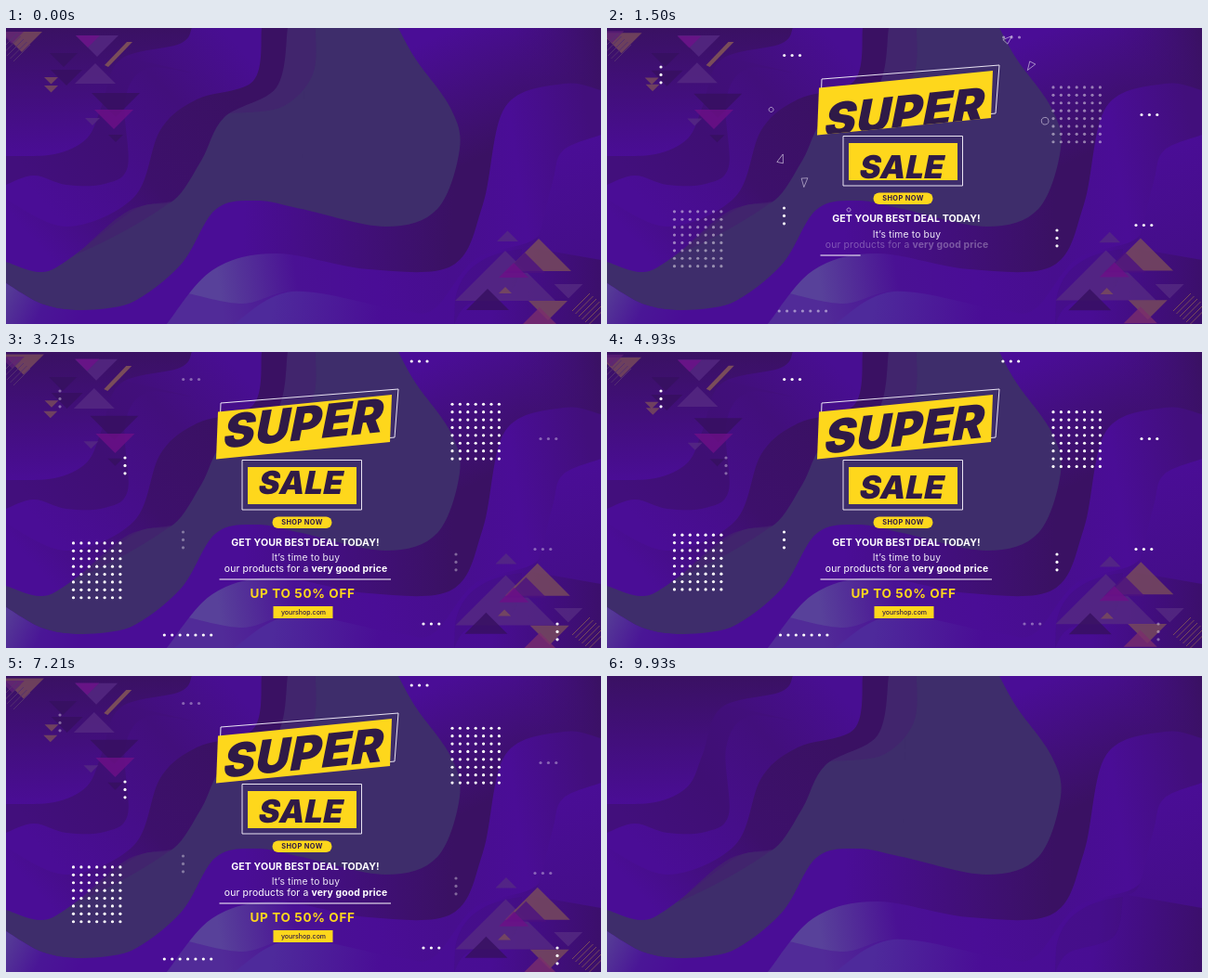
These frames come from a looping animation (640x319 px, 10000 ms). An HTML page:

```html
<!DOCTYPE html>
<html lang="en">
<head>
<meta charset="utf-8">
<title>Super sale banner</title>
<style>
html, body { margin: 0; width: 100%; height: 100%; overflow: hidden; background: #3d1070; }
svg { display: block; width: 640px; height: 319px; font-family: Inter, Lato, sans-serif; }
</style>
</head>
<body>
<svg id="stage" viewBox="0 0 640 319" xmlns="http://www.w3.org/2000/svg"></svg>
<script>
const LOOP = 10, PERIOD = 4;
const YELLOW = '#fed71c', INK = '#2f1a47', BLOB = '#3e2d6b';
const DARK = '#3a1163', MID = '#420f7c', BRIGHT = '#4a0d96', PALE = '#553b96';
const stage = document.getElementById('stage');

function set(node, attrs) {
  for (const k in attrs) node.setAttribute(k, attrs[k]);
}
function el(tag, attrs = {}, parent = stage) {
  const node = document.createElementNS('http://www.w3.org/2000/svg', tag);
  set(node, attrs);
  parent.appendChild(node);
  return node;
}
const ramp = (t, a, b) => Math.max(0, Math.min(1, (t - a) / (b - a)));
const fade = (t, a, b) => { const p = ramp(t, a, b); return p * p * (3 - 2 * p); };
const easeOut = p => 1 - Math.pow(1 - p, 3);
let seed = 7;
const random = () => (seed = seed * 16807 % 2147483647) / 2147483647;

// ---- Backdrop ----
const defs = el('defs');
function gradient(x1, y1, x2, y2, ...stops) {
  const id = 'g' + defs.childNodes.length;
  const g = el('linearGradient', { id, gradientUnits: 'userSpaceOnUse', x1, y1, x2, y2 }, defs);
  stops.forEach((c, i) => el('stop', { offset: i / (stops.length - 1), 'stop-color': c }, g));
  return `url(#${id})`;
}
// Smooth curve through a few "x,y" points
function curve(text) {
  const p = text.split(' ').map(s => s.split(',').map(Number));
  const pull = (a, b, c, s) => a.map((v, i) => v + s * (c[i] - b[i]) / 6);
  let d = 'M' + p[0];
  for (let i = 0; i < p.length - 1; i++) {
    const a = p[i - 1] || p[i], b = p[i], c = p[i + 1], e = p[i + 2] || c;
    d += `C${pull(b, a, c, 1)} ${pull(c, b, e, -1)} ${c}`;
  }
  return d;
}
const area = (points, close, fill, opacity = 1) =>
  el('path', { d: curve(points) + close + 'Z', fill, opacity });

el('rect', { width: 640, height: 319, fill: gradient(255, 215, 480, 225, BRIGHT, MID, DARK) });
el('rect', { x: 420, width: 220, height: 170, fill: gradient(470, 5, 530, 130, BRIGHT, MID, DARK) });
el('rect', { x: 540, width: 100, height: 80, fill: gradient(550, 30, 640, 10, '#430f8000', DARK) });
area('422,0 441,34 478,86 488,130 464,195 408,214 318,195 270,186 225,196 188,255 133,297 83,304 40,298 0,275',
  'L0,0', BLOB);
area('0,275 40,298 83,304 133,297 173,274', 'L173,319L0,319', gradient(0, 285, 75, 325, PALE, '#4a1696', BRIGHT));

// nested layers, top left
const corner = 'L0,0';
area('333,0 330,50 297,85 240,92', 'L240,0', '#43236f', .8);
area('303,0 291,64 235,96 210,143 180,186 140,195 65,251 36,263 0,252', corner,
  gradient(240, 60, 40, 240, DARK, '#3d106b', BRIGHT));
area('178,187 130,198 76,244', 'Q135,218 178,187', '#43226f', .8);
area('275,0 266,57 205,77 166,110 138,182 66,214 0,185', corner,
  gradient(250, 20, 50, 200, '#480e92', MID, '#460e8a', BRIGHT));
area('199,48 150,44 128,78 131,149 106,168 65,169 30,159 0,169', corner,
  gradient(170, 50, 30, 165, MID, '#3f0f74', MID));
area('200,0 187,17 123,34 103,84 87,119 52,136 0,138', corner, gradient(60, 0, 60, 140, DARK, MID, BRIGHT));

// front waves
area('173,319 222,261 290,243 390,260 480,256 513,190 537,85 600,60 640,67', 'L640,319',
  gradient(225, 250, 640, 190, '#58419a', '#4a1194', BRIGHT, '#470e8e', BRIGHT, MID));
area('196,286 255,297 310,284 400,299', 'L400,319L173,319', '#4a1096', .45);
area('245,319 308,284 420,303 460,303 505,249 573,224 588,165 599,132 640,115', 'L640,319',
  gradient(290, 270, 640, 310, '#4e2a9b', BRIGHT, '#480d93', '#3b0f6a'));
area('560,236 573,224 588,165 599,132 640,115', 'L640,250', gradient(590, 130, 640, 245, '#4a0d96', '#440e88'));
area('482,319 497,298 545,281 555,238', 'Q490,245 483,294', '#3d1070', .25);

// ---- Corner triangles, each drifting a little ----
const ORANGE = '#7a4d5a', PLUM = '#552a82', MAGENTA = '#6d1088', SHADE = '#36105f';
const deco = el('g');
const shards = [];
function shard(tag, attrs) {
  shards.push({ node: el(tag, attrs, deco), dx: 4 * random() - 2, dy: 4 * random() - 2 });
}
// Half squares: base centre x, y and width; dir 1 points down, -1 up
const half = (fill, dir, x, y, w) =>
  shard('path', { d: `M${x - w / 2},${y}h${w}l${-w / 2},${dir * w / 2}Z`, fill, opacity: .8 });
const hatch = (x, y, n, len, stroke) => {
  for (let i = 0; i < n; i++) el('path', { d: `M${x + i * 3.5},${y + i * 3}l${len},${-len}`, stroke }, deco);
};
half(ORANGE, 1, 17, 4, 44);
half('#5d1f76', 1, 6, 4, 26);
hatch(-6, 24, 5, 18, '#54306f');
half(SHADE, 1, 62, 27, 30);
half(SHADE, 1, 65, 45, 34);
half(PLUM, 1, 98, 8, 46);
half(MAGENTA, 1, 88, 8, 26);
half(PLUM, -1, 96, 60, 44);
for (const y of [53, 62]) half(ORANGE, 1, 48.5, y, 15);
shard('path', { d: 'M106,40l4,2 26,-27h-6Z', fill: ORANGE });
half(SHADE, 1, 118, 70, 52);
half(MAGENTA, 1, 116, 88, 42);
half(PLUM, 1, 93, 97, 16);
half(SHADE, 1, 118, 115, 16);

half(PLUM, -1, 539.5, 230, 23);
half(PLUM, -1, 537, 294, 108);
half(ORANGE, -1, 573, 262, 70);
half('#4b1180', -1, 558, 264, 44);
half(MAGENTA, -1, 546, 269, 32);
half(SHADE, -1, 518, 304, 46);
half(ORANGE, -1, 537, 286, 14);
half(ORANGE, 1, 583, 294, 42);
half(PLUM, 1, 605, 276, 31);
half('#7b2d6c', -1, 574, 319, 36);
hatch(609, 305, 6, 19, ORANGE);

// ---- Dots: all on one pitch ----
const PITCH = 8.4;
const dotSets = [];
function dots(x, y, cols, rows, alpha, mx = 0, my = 0) {
  const node = el('g', { fill: '#fff' });
  for (let i = 0; i < cols * rows; i++)
    el('circle', { cx: x + i % cols * PITCH, cy: y + Math.floor(i / cols) * PITCH, r: 1.6 }, node);
  dotSets.push({ node, alpha, mx, my });
}
const wave = t => Math.cos(2 * Math.PI * (t - 3.1) / PERIOD);
const appear = t => fade(t, .4, 2.7);
const glow = (side, start) => t => fade(t, start, start + 1) * (.68 + side * .32 * wave(t));
const early = glow(1, 1.5), late = glow(-1, .5);
dots(72.5, 201.5, 7, 8, appear, 0, 4.5);
dots(480, 60.5, 7, 8, appear, 0, -4.3);
dots(178.5, 305, 7, 1, appear, -8.3);
dots(431, 10, 3, 1, appear, 5.3);
for (const [x, y] of [[190.7, 29.5], [575, 93.5], [569, 212.5]]) dots(x, y, 3, 1, late);
for (const [x, y] of [[58, 42], [190.5, 194], [484, 218]]) dots(x, y, 1, 3, late);
for (const [x, y] of [[128, 114], [593, 293]]) dots(x, y, 1, 3, early);
dots(449, 293, 3, 1, early);

// ---- Outlined confetti bursting from behind the headline ----
const confetti = [[413, 23, 0], [432, 47, 0], [214, 128, 0], [234, 149, 0], [445, 95, 4.5], [205, 85, 3], [273, 173, 2.4]]
  .map(([x, y, r], i) => {
    const style = { fill: 'none', stroke: '#d9d0e6', 'stroke-width': .9 };
    const node = r ? el('circle', { r, ...style }) : el('path', { d: 'M0,-6L4,5L-4,6Z', ...style });
    return { node, x, y, turn: i * 165 };
  });

// ---- Headline panels ----
const outline = { fill: 'none', stroke: '#e9e3f2', 'stroke-width': 1, 'vector-effect': 'non-scaling-stroke' };
function panel(points, frame, cx, word, size, tilt, base, gap) {
  const id = word.toLowerCase();
  const box = el('g');
  el('polygon', { points: frame, ...outline }, box);
  el('polygon', { points, fill: YELLOW }, box);
  const mask = el('polygon', { points }, el('clipPath', { id }, defs));
  const reel = el('g', { 'clip-path': `url(#${id})`, fill: INK, 'text-anchor': 'middle', 'font-weight': 900, 'font-size': size });
  const words = [0, 1, 2].map(() => el('text', { 'letter-spacing': size / 100 }, reel));
  words.forEach(w => w.textContent = word);
  return (sx, roll) => {
    const transform = `translate(${cx} 0) scale(${Math.max(sx, .0001)} 1) translate(${-cx} 0)`;
    set(box, { transform, opacity: sx > 0 ? 1 : 0 });
    set(mask, { transform });
    words.forEach((w, i) =>
      set(w, { transform: `matrix(1 ${tilt} -.2 1 ${cx - 3} ${base + roll - gap * i})` }));
  };
}
const superPanel = panel('228,64.5 415,46 413,97 226,115.5', '231,55 422,40 418,92 229,110',
  320.5, 'SUPER', 51, -.104, 101, 66);
const salePanel = panel('260,124 377,124 377,164 260,164', '254,116.5 382.5,116.5 382.5,170 254,170',
  318.5, 'SALE', 34.3, 0, 158, 52);

// Fast roll in, a long overshoot, then rest
const roll = (t, from, high, low) =>
  from * (1 - easeOut(ramp(t, .35, 1.6))) + high * (1 - fade(t, 1.6, 3.1)) + low * (fade(t, 1.6, 3.1) - fade(t, 3.3, 4.5));

// ---- Copy ----
function label(str, x, y, size, weight, fill, spacing = 0, parent = stage) {
  const node = el('text', { x, y, 'font-size': size, 'font-weight': weight, fill, 'letter-spacing': spacing, 'text-anchor': 'middle' }, parent);
  node.textContent = str;
  return node;
}
const button = el('g');
el('rect', { x: 286.5, y: 177.5, width: 64, height: 12.5, rx: 6.25, fill: YELLOW }, button);
label('SHOP NOW', 318.5, 186.4, 7.4, 700, INK, .4, button);
const offer = label('GET YOUR BEST DEAL TODAY!', 322, 209, 10.6, 700, '#fff', .08);
const line1 = label('It’s time to buy', 322.5, 0, 10.3, 400, '#efe9f7', .17);
const line2 = label('our products for a ', 322.5, 237, 10.4, 400, '#fff', .14);
el('tspan', { 'font-weight': 700 }, line2).textContent = 'very good price';
const rule = el('rect', { x: 229.5, y: 244.5, height: 1, fill: '#fff' });
const percent = label('UP TO 50% OFF', 319, 0, 13.5, 700, YELLOW, .65);
const site = el('g');
el('rect', { x: 287.5, y: 274, width: 64, height: 13, fill: YELLOW }, site);
label('yourshop.com', 320, 282.8, 7, 500, INK, 0, site);

// ---- Motion ----
function draw(t) {
  const out = 1 - fade(t, 9, 9.7);
  const w = wave(t), sway = Math.sin(2 * Math.PI * t / PERIOD);

  set(deco, { opacity: 1 - ramp(t, 9.5, 9.85) });
  for (const s of shards) set(s.node, { transform: `translate(${s.dx * sway} ${s.dy * sway})` });
  for (const d of dotSets)
    set(d.node, { opacity: d.alpha(t) * out, transform: `translate(${d.mx * w} ${d.my * w})` });

  const spread = .5 + .8 * easeOut(ramp(t, .4, 2.4));
  for (const c of confetti) set(c.node, {
    transform: `translate(${330 + (c.x - 330) * spread} ${72 + (c.y - 72) * spread}) rotate(${c.turn + 40 * spread}) scale(${1.7 - .7 * spread})`,
    opacity: fade(t, .5, .85) * (1 - ramp(t, 1.2, 2.6))
  });

  const sx = easeOut(ramp(t, .4, 1.5)) * out;
  superPanel(sx, roll(t, 110, 8, -6));
  salePanel(sx, roll(t, 30, 4, -5));

  const show = (node, a, b) => set(node, { opacity: fade(t, a, b) * out });
  show(button, .45, .85);
  show(offer, .5, .92);
  show(line1, .6, 1.1);
  show(line2, 1.3, 1.85);
  show(percent, 1.65, 2.35);
  show(site, 2.5, 3.05);
  set(line1, { y: 229.5 - 5 * fade(t, 1.2, 1.7) });
  set(percent, { y: 270 - 5 * fade(t, 2.25, 2.9) });
  set(rule, { width: 184.5 * easeOut(ramp(t, 1.45, 2.05)) * out });
}

const start = performance.now();
function tick() {
  draw((performance.now() - start) / 1000 % LOOP);
  requestAnimationFrame(tick);
}
draw(0);
requestAnimationFrame(tick);
</script>
</body>
</html>
```
